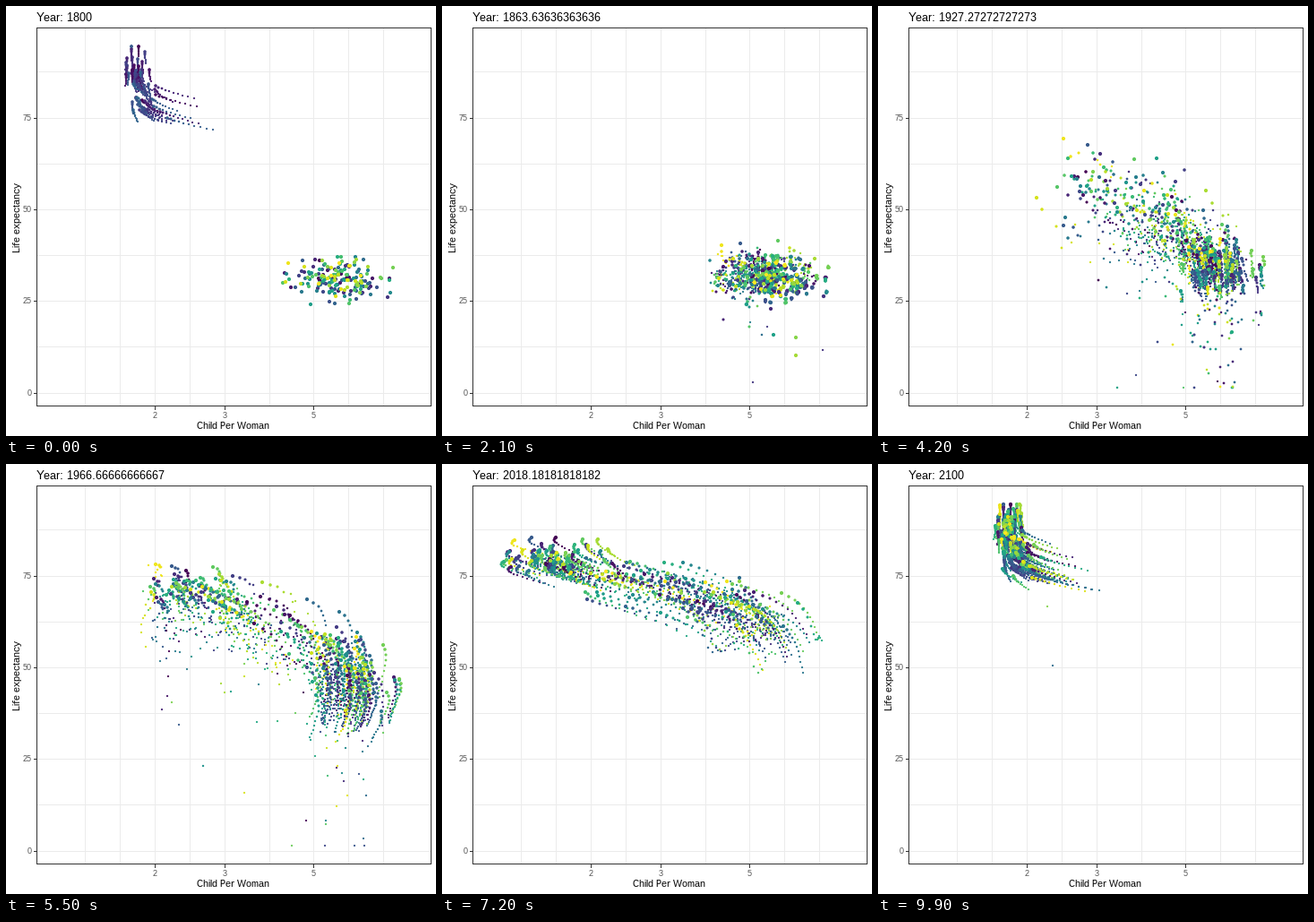
Recreate the animation shown at these times as a matplotlib script. Size 480 by 480 pixels, loop 10000 ms.

```python
import numpy as np
import matplotlib.pyplot as plt
from matplotlib.animation import FuncAnimation
from matplotlib.patches import Rectangle

plt.rcParams.update({
    "font.family": "Liberation Sans",
    "text.hinting": "default",
    "text.hinting_factor": 1,
})

FRAMES, WAKE, N = 100, 10, 184
years = np.linspace(1800, 2100, FRAMES)
rng = np.random.default_rng(12)


def px(fertility):
    return 166 + 193.2 * np.log(fertility / 2)


def py(life):
    return 432 - 4.093 * life


def rise(mid, width):
    return 1 / (1 + np.exp((mid - years) / width))


def bump(mid, width):
    return np.exp(-((years - mid) / width) ** 2)


def normal(columns=1):
    return np.clip(rng.normal(size=(N, columns)), -2.1, 2.1)


def make_paths():
    # Development level: early movers above 0.7, late movers below 0.62
    early = rng.random((N, 1)) < 0.36
    dev = np.where(early, rng.uniform(0.7, 1, (N, 1)), rng.uniform(0, 0.62, (N, 1)))

    # Fertility falls once, from a high plateau to about 1.8
    before = 6.3 - 1.3 * dev ** 2
    fall = rise(2035 - 120 * dev ** 1.2 + 7 * normal(), 22 - 9 * dev)
    fert = before + (1.8 - before) * fall
    fert += 0.5 * bump(1963, 17) - 0.25 * dev * bump(2012, 22)
    fert = np.log(fert)
    fert += normal() * (0.035 + 0.075 * (1 - rise(2045, 10)) + 0.04 * bump(2012, 25))

    # Life expectancy climbs once, then keeps growing slowly
    climb = rise(1968 - 50 * dev ** 1.6 + 6 * normal(), 20 - 4 * dev)
    life = 30 + 2 * dev + (30 + 14 * np.sqrt(dev)) * climb
    life += 0.115 * np.maximum(years - 1970, 0) + normal() * (3.6 - 1.6 * dev)

    # Yearly noise fades out after the middle of the 20th century
    rough = np.where(early, 1, 0.08) * rise(1840, 10) * (1 - rise(1950, 4))
    fert += 0.035 * rough * normal(FRAMES)
    life += 2.3 * rough * normal(FRAMES)

    # Famines, the 1918 flu, war years
    chance = 0.0005 + 0.012 * rise(1840, 8) * (1 - rise(1952, 2))
    chance = chance + 0.55 * bump(1918, 2) + 0.38 * dev * bump(1943, 4)
    hit = rng.random((N, FRAMES)) < chance
    life -= hit * (4 + rng.exponential(10, (N, FRAMES)))

    # Epidemic around 2004 in some low-level places
    struck = (dev < 0.4) & (rng.random((N, 1)) < 0.2)
    life -= struck * rng.uniform(6, 14, (N, 1)) * bump(2004, 9)
    return px(np.exp(fert)), py(np.clip(life, 1.5, 94.5))


fig = plt.figure(figsize=(480 / 72, 480 / 72), dpi=72, facecolor="white")
ax = fig.add_axes([0, 0, 1, 1])
ax.set(xlim=(0, 480), ylim=(480, 0))
ax.axis("off")


def line(xs, ys, color, z):
    ax.plot(xs, ys, color=color, lw=1, antialiased=False, zorder=z, solid_capstyle="butt")


def label(x, y, text, size, color="black", **kw):
    return ax.text(x, y, text, fontsize=size, color=color, va="baseline", **kw)


GRID, DARK, GREY = "#EBEBEB", "#333333", "#4D4D4D"
two, three, five = px(np.array([2, 3, 5]))
half = (three - two) / 2
for x in [*(two + half * np.arange(-2, 3)), (three + five) / 2, *(five + half * np.arange(3))]:
    line([round(x)] * 2, [25, 446], GRID, 1)
for v in np.arange(0, 90, 12.5):
    line([35, 474], [np.floor(py(v))] * 2, GRID, 1)
for v in (2, 3, 5):
    x = round(px(v))
    line([x] * 2, [447, 450], DARK, 4)
    label(x, 460, str(v), 9, GREY, ha="center")
for v in (0, 25, 50, 75):
    y = np.floor(py(v))
    line([31, 34], [y] * 2, DARK, 4)
    label(29, y + 3, str(v), 9, GREY, ha="right")
ax.add_patch(Rectangle((34, 24), 440, 422, fill=False, ec=DARK, lw=1, antialiased=False, zorder=4))
label(253.5, 472, "Child Per Woman", 11, ha="center")
label(16, 236, "Life expectancy", 11, ha="center", rotation=90, rotation_mode="anchor")
title = label(34, 17, "", 13)

X, Y = make_paths()
colors = plt.cm.viridis(np.linspace(0, 1, N))
dots = ax.scatter([], [], linewidths=0, zorder=3)


def update(i):
    points, sizes, fills = [], [], []
    for k in range(WAKE, -1, -1):
        # Only the darker third carries its wake over the loop's seam
        count = N if i >= k else N // 3
        j = (i - k) % FRAMES
        points.append(np.column_stack([X[:count, j], Y[:count, j]]))
        diameter = 2.2 + 2 * (1 - k / (WAKE + 1)) ** 4
        sizes.append(np.full(count, diameter ** 2))
        fills.append(colors[:count])
    dots.set_offsets(np.round(np.concatenate(points)))
    dots.set_sizes(np.concatenate(sizes), dpi=72)
    dots.set_facecolors(np.concatenate(fills))
    title.set_text(f"Year: {years[i]:.15g}")
    return dots, title


anim = FuncAnimation(fig, update, frames=FRAMES, interval=100, repeat=True, repeat_delay=0)
plt.show()
```
